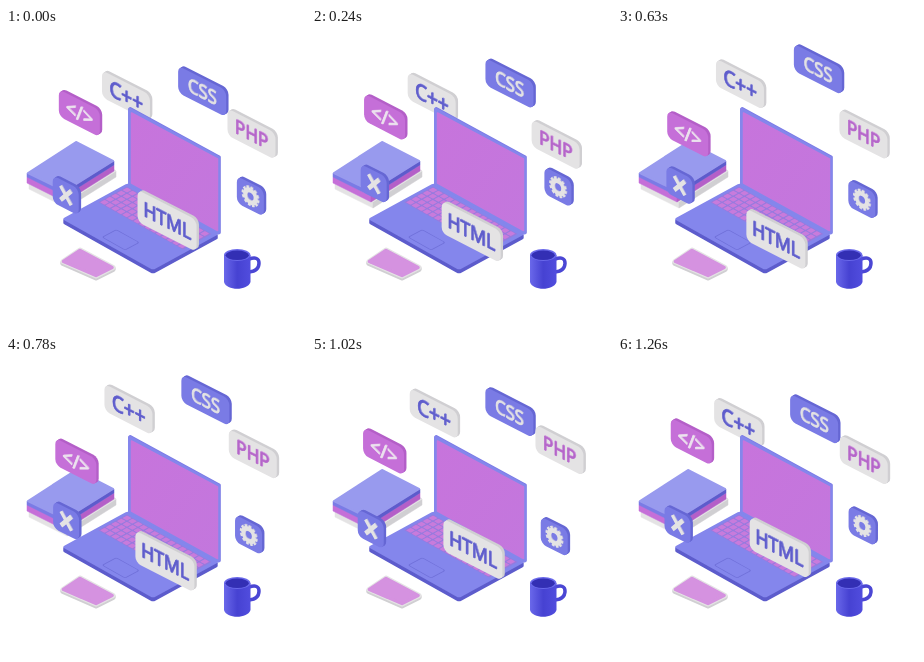
Recreate the animation shown at these times as an HTML page. Size 300x300 px, loop 1.29 s.

```html
<!DOCTYPE html>
<html lang="en">
<meta charset="utf-8">
<title>Web development desk</title>
<style>
html, body { margin: 0; width: 100%; height: 100%; overflow: hidden; background: #fff; }
svg { display: block; width: 100%; height: 100%; }
text { font: 400 20px "Open Sans", "Noto Sans", sans-serif; text-anchor: middle; stroke-width: .7; }
</style>
<svg id="stage" viewBox="0 0 300 300">
  <defs>
    <linearGradient id="screen" x2="1" y2="1"><stop stop-color="#c774dc"/><stop offset="1" stop-color="#c377dd"/></linearGradient>
    <linearGradient id="mug"><stop stop-color="#6a68ea"/><stop offset=".5" stop-color="#4642d2"/><stop offset="1" stop-color="#514dde"/></linearGradient>
  </defs>
</svg>
<script>
const LOOP = 1290, STEP = 30;
const BLUE = '#7a7be5', PALE = '#8486ec', NAVY = '#5d5ccc', PINK = '#c56fd8', PLUM = '#b45fc8', WHITE = '#e4e3e4', GREY = '#d0cfd2';
const stage = document.getElementById('stage');

const poly = (points, fill, round = 1) =>
  `<polygon points="${points}" fill="${fill}" stroke="${fill}" stroke-width="${round}" stroke-linejoin="round"/>`;
// Repeats a shape from its far layer to its near one.
const stack = (shape, count, dx, dy) => Array.from({ length: count }, (_, i) =>
  `<g transform="translate(${dx * (count - i)} ${dy * (count - i)})">${shape}</g>`).join('');

function book(x, y, height, top, left, right) {
  const side = (points, fill) => poly(points, fill, .5);
  return `<g transform="translate(${x} ${y})">` +
    side(`0,0 38,19 38,${19 + height} 0,${height}`, left) +
    side(`38,19 87,-12 87,${height - 12} 38,${19 + height}`, right) +
    poly('1,0 49,-31 86,-12 38,18', top, 2) + '</g>';
}
const books = () =>
  book(23, 155, 6, WHITE, WHITE, GREY) +
  book(21, 149, 6, PINK, PINK, PLUM) +
  book(21, 145, 4, '#989aee', BLUE, NAVY);

function laptop() {
  const plane = 'transform="matrix(-66 36 91 51 122 155)"';
  const base = fill => `<rect ${plane} width="1" height="1" rx=".035" ry=".03" fill="${fill}"/>`;
  let keys = '';
  for (let row = 0; row < 5; row++)
    for (let col = 0; col < 15; col++)
      keys += `<rect x="${.07 + row * .085}" y="${.04 + col * .061}" width=".07" height=".049" rx=".01"/>`;
  const lid = '123.500,81 212.500,129.500 212.500,205 123.500,156';
  return stack(base(NAVY), 4, 0, 1) + base(PALE) +
    `<g ${plane}><rect x=".06" y=".03" width=".43" height=".93" fill="#977ade"/><g fill="#c87bdc">${keys}</g>
      <rect x=".73" y=".4" width=".21" height=".25" rx=".02" fill="none" stroke="#7071da" stroke-width=".01"/></g>` +
    stack(poly(lid, BLUE, 3), 1, .8, -.5) + poly(lid, PALE, 3) +
    poly('125.500,85 211.500,131 211.500,202.500 125.500,155', 'url(#screen)', 1.5);
}

function phone() {
  const body = fill => poly('57,233.500 74,222 107,239.500 90,248', fill, 5);
  return stack(body(GREY), 2, 0, 1) + body(WHITE) + poly('57.500,233.500 74,222.500 106,239.500 90,247.500', '#d592e0', 3.5);
}

const mug = () => `
  <path d="M243 231q10-3 10 4q0 8-10 9" fill="none" stroke="#4b47d4" stroke-width="3.500"/>
  <path d="M218 227v27c2 9 24 9 26.500 0v-27z" fill="url(#mug)"/>
  <ellipse cx="231.200" cy="227" rx="13.200" ry="6" fill="#6a69ea"/>
  <ellipse cx="231.200" cy="227.300" rx="11.600" ry="4.800" fill="#332fb4"/>`;

// Raised sign: a shaded copy lies behind the face.
const raised = draw => (fill, edge) => `<g transform="translate(.8 -.8)">${draw(edge)}</g>` + draw(fill);
const label = (string, size = 20) => raised(color =>
  `<text y="${size * .36}" style="font-size:${size}px" fill="${color}" stroke="${color}">${string}</text>`);
const cross = raised(color => `<path d="M-6-7L6 7M6-7L-6 7" stroke="${color}" stroke-width="4"/>`);
const gear = raised(color => `<g fill="none" stroke="${color}"><circle r="6" stroke-width="4.500"/>
  <circle r="8.700" stroke-width="2.500" pathLength="24" stroke-dasharray="1.200 .8"/></g>`);

const blue = [BLUE, '#6667d4', WHITE, '#b5b3de'];
const pink = [PINK, PLUM, '#ece3ee', '#dcb0e4'];
const white = [WHITE, GREY, '#5f5dcc', '#8d8cd9'];
const whitePink = [WHITE, GREY, '#b566ca', '#cf98dc'];

// Centre, size, swing height and the moment (ms) at the lowest point.
const panels = [
  { x: 121, y: 62, w: 48, h: 27, swing: 8.500, low: 160, skin: white, icon: label('C++', 21.500) },
  { x: 198, y: 52.500, w: 48, h: 27, swing: 11, low: -20, skin: blue, icon: label('CSS', 19) },
  { x: 245.500, y: 106, w: 48, h: 27, swing: 12, low: 320, skin: whitePink, icon: label('PHP', 19.500) },
  { x: 71.500, y: 96, w: 41, h: 27, swing: 11, low: 690, skin: pink, icon: label('&lt;/&gt;', 20.500) },
  { x: 60.500, y: 163, w: 26, h: 27, swing: 10.500, low: 1060, skin: blue, icon: cross },
  { x: 244, y: 170.500, w: 27, h: 27, swing: 11.500, low: 930, skin: blue, icon: gear },
  { x: 159.500, y: 202, w: 59, h: 32, swing: 11, low: 525, skin: white, icon: label('HTML') }
];

function panel({ w, h, skin: [face, side, ink, inkSide], icon }) {
  const width = w / .88;
  const plate = fill =>
    `<rect x="${-width / 2}" y="${-h / 2}" width="${width}" height="${h}" rx="6" fill="${fill}"/>`;
  const iso = shape => `<g transform="matrix(.88 .45 0 1 0 0)">${shape}</g>`;
  return `<g class="panel">${stack(iso(plate(side)), 3, .8, -.5)}${iso(plate(face) + icon(ink, inkSide))}</g>`;
}

const [cpp, ...front] = panels.map(panel);
stage.innerHTML += books() + cpp + laptop() + phone() + mug() + front.join('');
const nodes = stage.querySelectorAll('.panel');

function draw(now) {
  const time = Math.floor(now % LOOP / STEP) * STEP;
  panels.forEach(({ x, y, swing, low }, i) => {
    const dy = swing * Math.cos((time - low) / LOOP * 2 * Math.PI);
    nodes[i].setAttribute('transform', `translate(${x - dy * .17} ${y + dy})`);
  });
  requestAnimationFrame(draw);
}
draw(performance.now());
</script>
</html>
```
